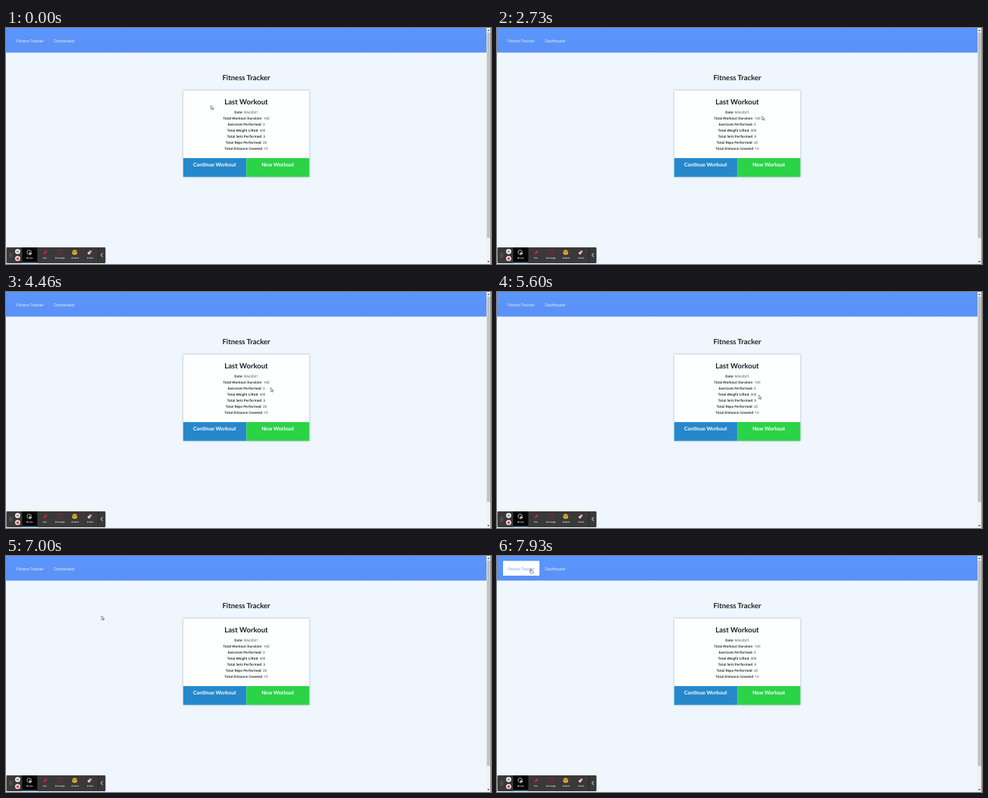
Animation, 640 px wide and 312 px high, one loop 8 s. Source, as an HTML page:

```html
<!DOCTYPE html>
<html lang="en">
<head>
<meta charset="utf-8">
<title>Fitness Tracker</title>
<style>
  html, body { margin: 0; width: 100%; height: 100%; overflow: hidden; background: #eff6fd; }
  svg { display: block; width: 640px; height: 312px; }
  text { text-rendering: geometricPrecision; font-family: "Open Sans", sans-serif; }
  .mid { text-anchor: middle; }
  .head { font: 700 9.5px Lato, sans-serif; fill: #202124; }
  .button { font: 700 6.85px Lato, sans-serif; fill: #fff; }
  .nav { font-size: 5.2px; fill: #fff; }
  .row { font-size: 4.5px; fill: #333; }
  .label { font-weight: 600; fill: #111; }
  .tool { font-size: 2.7px; font-weight: 600; fill: #fff; }
  .card { filter: drop-shadow(0 .5px 1.2px #8fa3b8); }
</style>
</head>
<body>
<svg viewBox="0 0 640 312">
  <defs>
    <linearGradient id="bar" x2="0" y2="1">
      <stop stop-color="#5b95fb"/><stop offset="1" stop-color="#5a91f7"/>
    </linearGradient>
  </defs>
  <rect width="640" height="312" fill="#eff6fd"/>
  <rect width="634" height="32.5" fill="url(#bar)"/>
  <rect id="hover" x="8" y="6.5" width="48" height="19.5" fill="#fff"/>
  <text class="nav" id="home" x="14" y="18.5">Fitness Tracker</text>
  <text class="nav" x="63.3" y="18.5">Dashboard</text>

  <text class="head mid" x="317" y="69">Fitness Tracker</text>
  <rect class="card" x="234" y="82.5" width="166.3" height="114.3" fill="#fdfefe"/>
  <text class="head mid" x="317" y="100.7">Last Workout</text>
  <g id="stats"></g>
  <rect x="234" y="172" width="83.2" height="24.8" fill="#2688cb"/>
  <rect x="317.2" y="172" width="83.1" height="24.8" fill="#2bd347"/>
  <text class="button mid" x="275.3" y="183.2">Continue Workout</text>
  <text class="button mid" x="358.6" y="183.2">New Workout</text>

  <!-- scrollbar -->
  <rect x="634" width="6" height="312" fill="#f1f1f1"/>
  <rect x="634.5" y="6" width="4.3" height="271.5" fill="#c1c1c1"/>
  <path d="M639.5 0V312" stroke="#666" stroke-width=".7"/>
  <path d="M635 4l1.6-2 1.6 2zM635 308l1.6 2 1.6-2z" fill="#505050"/>

  <!-- drawing toolbar -->
  <rect x=".5" y="290" width="130.8" height="21" rx="1.2" fill="#393939"/>
  <rect x="21.3" y="290.3" width="20" height="20.4" fill="#050505"/>
  <path d="M21.3 310.2h20" stroke="#68a9d8" stroke-width=".9"/>
  <path d="M121.4 290v21" stroke="#202020" stroke-width=".6"/>
  <path d="M5.1 297.8v6M7.1 297.8v6" stroke="#ccc" stroke-width=".8" stroke-dasharray=".8 1.5"/>
  <circle cx="15.4" cy="295.6" r="3.3" fill="#fff"/>
  <path d="M14.6 294.1v3M16.2 294.1v3" stroke="#333" stroke-width=".8"/>
  <circle cx="15.4" cy="304.8" r="3.3" fill="#fff"/>
  <rect x="13.8" y="303.2" width="3.2" height="3.2" rx=".5" fill="#e3213c"/>
  <circle cx="30.6" cy="296.5" r="2.8" fill="none" stroke="#fff" stroke-width=".7"/>
  <path d="M30.4 295.7l4 3.2-1.8.2-.9 1.6z" fill="#fff"/>
  <path d="M49.4 299.2l.6-2.2 2.7-3.2 1.8 1.5-2.8 3.2z" fill="#ed1740"/>
  <rect x="68.4" y="294" width="5.4" height="5.3" fill="none" stroke="#c41635" stroke-width=".8" stroke-dasharray="1.3 .6"/>
  <circle cx="90.6" cy="296.7" r="3.3" fill="#f6bd31"/>
  <path d="M87.7 295.9h2.6M91 295.9h2.6" stroke="#5a3d12" stroke-width="1"/>
  <path d="M89 298q1.6 1.4 3.2 0" fill="none" stroke="#8b421b" stroke-width=".6"/>
  <path d="M107.4 297.8l3.7-4 2.4 1.7-3.7 4z" fill="#f09aa5"/>
  <path d="M107.4 297.8l1.2-1.3 2.4 1.7-1.2 1.3z" fill="#f5e6e8"/>
  <path d="M127.5 297.7l-2.1 2.5 2.1 2.5" fill="none" stroke="#fff" stroke-width=".9"/>
  <g id="tools"></g>

  <g id="pointer" stroke="#222" stroke-width=".5" stroke-linejoin="round" fill="#fff">
    <path id="arrow" d="M0 0V5.1L1.2 4l.8 1.8.9-.4-.8-1.7h1.7z"/>
    <path id="hand" d="M0 .5q.6-.8 1 0v2l2.5.6q.6.2.5 1L3.6 6H.8L-1.2 3.8q.2-.8 1.2 0z"/>
  </g>
</svg>
<script>
const $ = id => document.getElementById(id);
const DURATION = 8000;

const stats = [
  ["Date", "8/6/2021"], ["Total Workout Duration", 140], ["Exercises Performed", 3],
  ["Total Weight Lifted", 400], ["Total Sets Performed", 8],
  ["Total Reps Performed", 20], ["Total Distance Covered", 10]
];
$("stats").innerHTML = stats.map(([label, value], i) =>
  `<text class="row mid" x="317" y="${112.7 + i * 8}"><tspan class="label">${label}</tspan>: ${value}</text>`).join("");
$("tools").innerHTML = ["Mouse", "Pen", "Rectangle", "Stickers", "Eraser"].map((name, i) =>
  `<text class="tool mid" x="${31.2 + i * 20}" y="305.2">${name}</text>`).join("");

// time, x, y of the pointer tip
const path = [
  [0, 270.5, 102.5], [60, 270.5, 102.5], [460, 316, 110], [1800, 320, 111],
  [2200, 348, 116], [2600, 348, 116], [2730, 349.7, 116.4], [3460, 349.7, 116.4],
  [3930, 347, 125], [4260, 347, 125], [4460, 349.3, 126.5], [4660, 349, 127],
  [5000, 349, 127], [5600, 345.3, 136.3], [6260, 345.3, 136.3],
  [7000, 126.2, 79.2], [7130, 118, 74], [7800, 44, 17], [8000, 44, 17]
];

function pointerAt(t) {
  const i = path.findIndex(p => p[0] > t);
  const [t0, x0, y0] = path[i - 1], [t1, x1, y1] = path[i];
  const u = (t - t0) / (t1 - t0), k = u * u * (3 - 2 * u);
  return [x0 + (x1 - x0) * k, y0 + (y1 - y0) * k];
}

function draw(now) {
  const t = now % DURATION;
  const [x, y] = pointerAt(t);
  const over = x > 8 && x < 56 && y > 6.5 && y < 26;
  const onText = t > 250 && t < 2130;
  $("pointer").setAttribute("transform", `translate(${x} ${y})`);
  $("arrow").style.display = over || onText ? "none" : "";
  $("hand").style.display = over ? "" : "none";
  $("hover").style.display = over ? "" : "none";
  $("home").style.fill = over ? "#5a93fa" : "#fff";
  requestAnimationFrame(draw);
}
requestAnimationFrame(draw);
</script>
</body>
</html>
```
